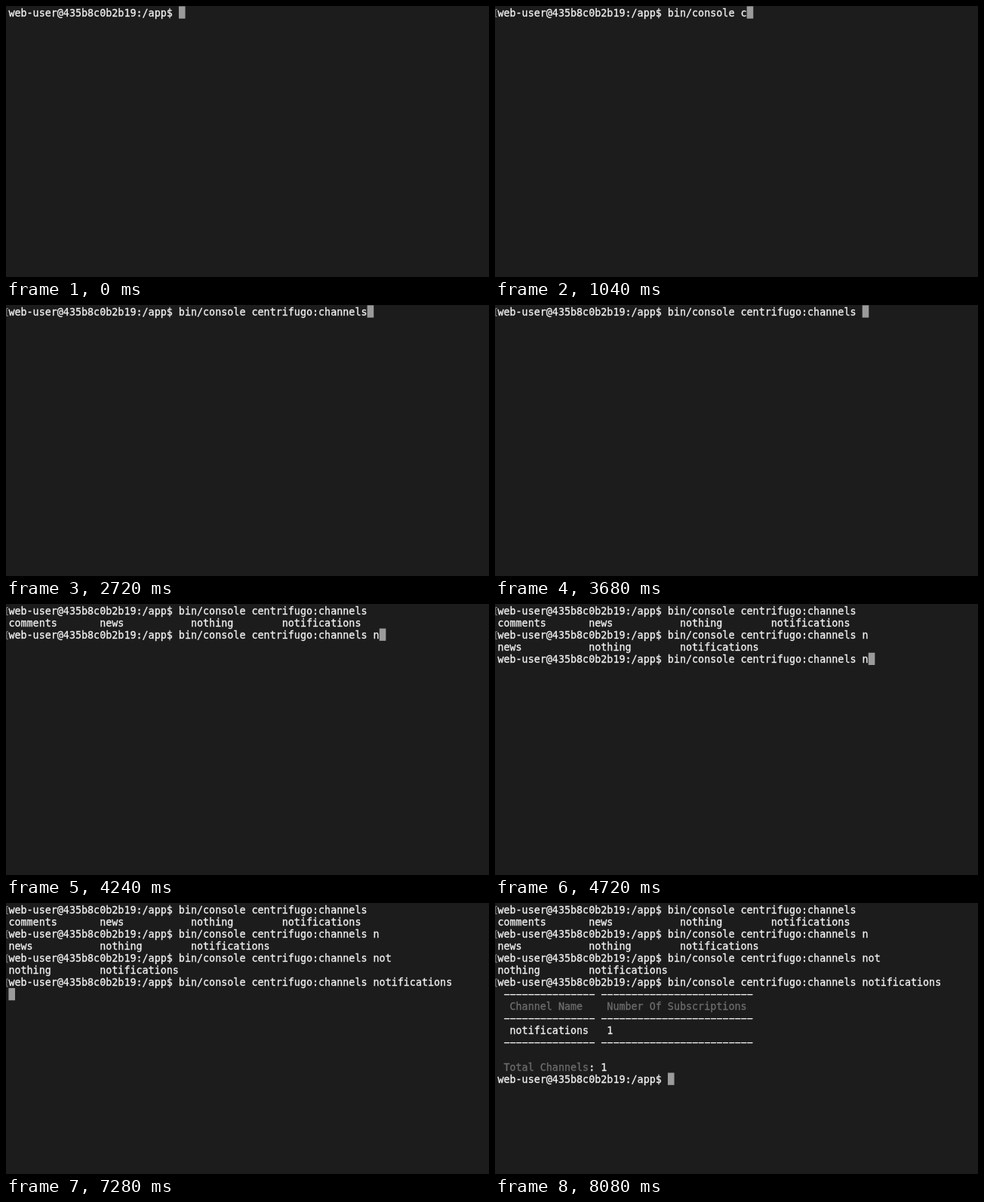
An HTML page that plays this animation: 640 px wide and 360 px high, repeating every 8160 ms.

```html
<!DOCTYPE html>
<html lang="en">
<head>
<meta charset="utf-8">
<title>Terminal completion</title>
<style>
html, body { margin: 0; width: 100%; height: 100%; overflow: hidden; background: #1c1c1c; }
svg { display: block; width: 640px; height: 360px; }
text {
  font: 13.38px "DejaVu Sans Mono", "Noto Sans Mono", monospace;
  white-space: pre; fill: #f2f2f2; stroke: #f2f2f2; stroke-width: .3px;
}
.dim { fill: #6c6c6c; stroke: #6c6c6c; }
.cursor { fill: #9b9b9b; }
.mark { fill: none; stroke: #8a8a8a; }
</style>
</head>
<body>
<svg id="screen" viewBox="0 0 640 360"></svg>
<script>
const LOOP = 8160, TICK = 80, CELL = 8.055, ROW = 16.08, LEFT = 3.4;
const PROMPT = 'web-user@435b8c0b2b19:/app$ ';
const CHANNELS = ['comments', 'news', 'nothing', 'notifications'];
const LISTED = [3760, 4640, 5440], ENTER = 7280, RESULT = 8000, MARK_DELAY = 320;

// Bursts of typing: text, time of its first and of its last character
const bursts = [
  ['bin', 80, 320], ['/co', 480, 640], ['nsole ', 720, 720],
  ['cent', 1040, 1360], ['rifugo', 1520, 1760], [':chan', 1920, 2320],
  ['nels', 2480, 2720], [' ', 3040, 3040], ['n', 3920, 3920],
  ['ot', 4800, 4960], ['i', 5760, 5760], ['fications ', 6960, 6960]
];

// The minus sign has the long stroke of the table rules
const dashes = n => '\u2212'.repeat(n);
const dim = s => `<tspan class="dim">${s}</tspan>`;
const rule = ` ${dashes(15)} ${dashes(25)}`;
const result = [
  rule,
  dim('  Channel Name    Number Of Subscriptions'),
  rule,
  '  notifications   1',
  rule,
  '',
  dim(' Total Channels') + ': 1',
  PROMPT
];

function typedAt(t) {
  return bursts.map(([text, from, to]) => {
    if (t < from) return '';
    if (t >= to) return text;
    return text.slice(0, 1 + Math.floor((text.length - 1) * (t - from) / (to - from)));
  }).join('');
}

function matches(command) {
  const prefix = command.split(' ').pop();
  return CHANNELS.filter(c => c.startsWith(prefix)).map(c => c.padEnd(15)).join('');
}

function draw(t) {
  const rows = [];
  for (const at of LISTED.filter(at => at <= t)) {
    const command = typedAt(at);
    rows.push(PROMPT + command, matches(command));
  }
  rows.push(PROMPT + typedAt(t));
  if (t >= RESULT) rows.push(...result);
  else if (t >= ENTER) rows.push('');

  const last = rows.length - 1;
  const cursorX = LEFT + rows[last].length * CELL;
  let out = `<rect class="cursor" x="${cursorX}" y="${0.4 + last * ROW}" width="8.6" height="16.3"/>`;
  rows.forEach((row, i) => {
    out += `<text x="${LEFT}" y="${13.6 + i * ROW}" xml:space="preserve">${row}</text>`;
  });
  [0, ...LISTED].forEach((at, i) => {
    if (t >= at + MARK_DELAY) out += `<path class="mark" d="M3 ${4.5 + 2 * i * ROW}H.9v10H3"/>`;
  });
  return out;
}

const screen = document.getElementById('screen');
let shown = '';
function frame() {
  const t = performance.now() % LOOP;
  const next = draw(t - t % TICK);
  if (next !== shown) screen.innerHTML = shown = next;
  requestAnimationFrame(frame);
}
frame();
</script>
</body>
</html>
```
